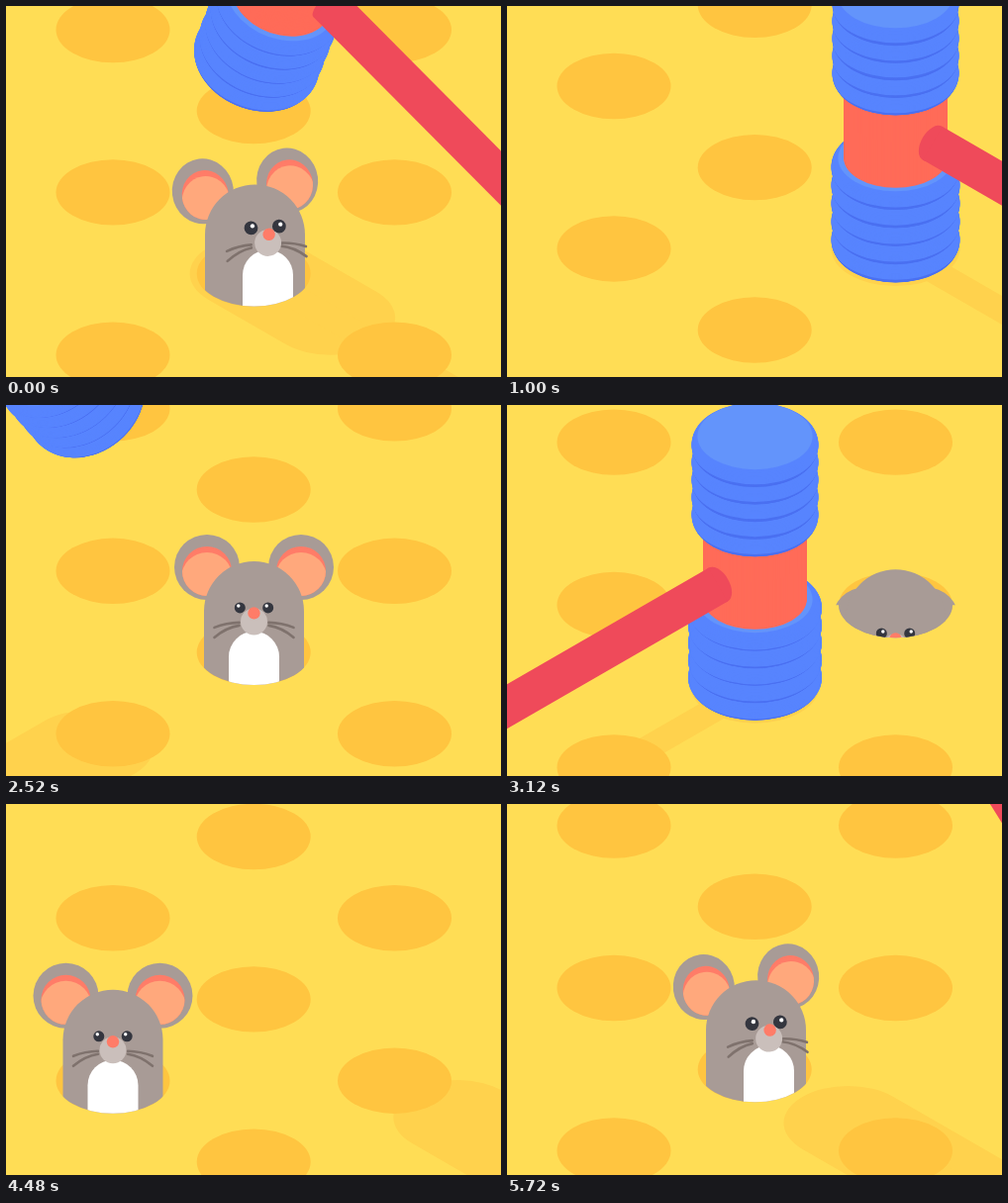
These frames come from a looping animation (500x375 px, 5.76 s). An HTML page with a canvas:

```html
<!DOCTYPE html>
<html>
<head>
<meta charset="utf-8">
<style>
html, body { margin: 0; width: 100%; height: 100%; overflow: hidden; background: #ffdd55; }
canvas { display: block; }
</style>
</head>
<body>
<canvas id="stage" width="500" height="375"></canvas>
<script>
const ctx = document.getElementById('stage').getContext('2d');
const LOOP = 5760, BEAT = 960, GAP = 164.4, SPEED = GAP / 2880;
const BLUE = '#5784fe', DARK = '#4a70f1', LIGHT = '#6394fb';
const FUR = '#a89b96', CORAL = '#ff7c68', SHADE = '#ffd24d';
const COS30 = Math.sqrt(3) / 2;
const RADIUS = 47.5, MID = 128.5, ARM = 580;

// Each hit: column x, hole y at impact, side the handle comes from
const hits = [
  [250.5, 270.4, 1], [392.5, 243.2, 1], [108, 298, -1],
  [250.5, 270.4, -1], [392.5, 243.2, 1], [108, 298, -1]
];

const clamp = v => Math.min(1, Math.max(0, v));
const smooth = v => (v = clamp(v), v * v * (3 - 2 * v));
const back = (v, c) => (v = clamp(v) - 1, 1 + (c + 1) * v ** 3 + c * v * v);
// Isometric view of the vertical plane that holds the handle
const project = (s, z) => [COS30 * s, s / 2 - z];
const ACROSS = [COS30, -0.5];

function circle(x, y, r, fill) {
  ctx.beginPath();
  ctx.arc(x, y, r, 0, 2 * Math.PI);
  ctx.fillStyle = fill;
  ctx.fill();
}

function disc([x, y], r, [ax, ay], [bx, by], fill) {
  ctx.save();
  ctx.transform(ax, ay, bx, by, x, y);
  circle(0, 0, r, fill);
  ctx.restore();
}

function line(from, to, width, color, cap = 'butt') {
  ctx.beginPath();
  ctx.moveTo(...from);
  ctx.lineTo(...to);
  ctx.lineWidth = width;
  ctx.lineCap = cap;
  ctx.strokeStyle = color;
  ctx.stroke();
}

function at(x, y, side, draw) {
  ctx.save();
  ctx.translate(x, y);
  ctx.scale(side, 1);
  draw();
  ctx.restore();
}

// Tilt of the mallet and the place of its middle, a ms after impact
function swing(a) {
  const u = Math.max(0, (30 - a) / 30);
  const deg = u > 0 ? Math.min(90, 21 * u ** 0.82) : 90 * clamp((a - 260) / 520) ** 2.3;
  const th = deg * Math.PI / 180, sin = Math.sin(th), cos = Math.cos(th);
  return { sin, cos, s: ARM * (1 - cos) + 9 * u * u, z: MID + ARM * sin };
}

function shadow(a) {
  const { sin, s } = swing(a), half = MID * sin;
  ctx.transform(COS30, 0.5, ...ACROSS, 0, 0);
  line([s - half, 0], [s + half + 0.01, 0], 106, SHADE, 'round');
  line([s, 0], [s + ARM + 200, 0], 29, SHADE);
}

function mallet(a) {
  const { sin, cos, s, z } = swing(a);
  const squash = 10 * Math.sin(Math.PI * clamp((a - 40) / 235));
  const point = (h, w) => project(
    s + (h - MID) * sin + w * cos,
    z + (h - MID) * cos - w * sin);
  const along = project(cos, -sin), up = project(sin, cos);
  const slice = (h, r, fill) => disc(point(h, 0), r, along, ACROSS, fill);

  function bellows(from, to, peak) {
    const ring = (to - from) / 5;
    for (let h = from; h < to; h++) {
      const phase = (h - from) / ring % 1;
      slice(h, RADIUS + (peak - RADIUS) * Math.sin(Math.PI * phase) ** 0.6,
        phase < 0.28 ? DARK : BLUE);
    }
    slice(to, RADIUS, LIGHT);
  }

  bellows(0, 92 - squash, 53 + squash / 2);
  for (let h = 92; h < 170; h++) slice(h - squash, 42.7, '#ff6b58');
  bellows(169 - squash, 257 - squash, 52.3);
  const grip = point(MID - squash, 43);
  disc(grip, 16, up, ACROSS, '#ef4a5a');
  line(grip, point(MID - squash, ARM + 250), 39, '#ef4a5a');
}

function ear(x, y, size, turn) {
  ctx.save();
  ctx.translate(x, y);
  ctx.scale(1 - 0.06 * turn, 1);
  circle(0, 0, 33, FUR);
  circle(2 * turn, 4, 25 * size, CORAL);
  ctx.clip();
  circle(2 * turn, 11, 26 * size, '#ffa87c');
  ctx.restore();
}

function dome(r, top, fill) {
  ctx.beginPath();
  ctx.arc(0, top + r, r, Math.PI, 0);
  ctx.lineTo(r, 200);
  ctx.lineTo(-r, 200);
  ctx.fillStyle = fill;
  ctx.fill();
}

function face(turn) {
  ctx.lineCap = 'round';
  ctx.lineWidth = 2.6;
  ctx.strokeStyle = '#7f726d';
  for (const s of [-1, 1]) {
    for (const [y, drop] of [[-30, 5], [-27, 12]]) {
      ctx.beginPath();
      ctx.moveTo(s * 15, y);
      ctx.quadraticCurveTo(s * 28, y - 1 + drop / 4, s * 40, y + drop);
      ctx.stroke();
    }
    const r = 5.5 + 1.4 * turn, y = -45 - 2 * turn;
    circle(s * 14.2, y, r, '#34363f');
    circle(s * 14.2 + 1.5, y - 2, r / 3.2, '#fff');
  }
  circle(2 * turn, -31, 13.5, '#cabfbb');
  circle(3.5 * turn, -39.5, 6.2, CORAL);
}

function mouse(a) {
  const rise = back((a + 755) / 250, 1.7), spread = back((a + 725) / 250, 3.5);
  const turn = smooth((a + 240) / 120);
  ctx.beginPath();
  ctx.rect(-200, -400, 400, 400);
  ctx.ellipse(0, 0, 57.5, 33, 0, 0, Math.PI);
  ctx.clip();
  ctx.translate(turn, 125 * (1 - rise) + 125 * clamp((a - 5) / 25));

  ctx.save();
  ctx.translate(-10 * turn, -86 - 2.5 * turn);
  ctx.rotate(-0.125 * turn);
  for (const s of [-1, 1])
    ear(s * (28 + 19.5 * spread - 4.5 * turn), 53 * (1 - spread), clamp(spread), turn);
  ctx.restore();

  dome(50.5, -92 + 2 * turn, FUR);
  ctx.translate(13 * turn, 21 * (1 - spread));
  dome(25.5, -21 - 3 * turn, '#fff');
  ctx.rotate(-0.06 * turn);
  face(turn);
}

function holes(t) {
  const shift = t * SPEED % GAP;
  for (const [x, y] of [[108, 23.9], [250.2, 106], [392.5, 23.9]])
    for (let i = -2; i < 3; i++) {
      ctx.beginPath();
      ctx.ellipse(x, y + shift + i * GAP, 57.5, 33.2, 0, 0, 2 * Math.PI);
      ctx.fillStyle = '#ffc540';
      ctx.fill();
    }
}

function frame(now) {
  const t = now % LOOP;
  ctx.fillStyle = '#ffdd55';
  ctx.fillRect(0, 0, 500, 375);
  const live = hits.map(([x, y, side], i) => {
    const a = (t - i * BEAT + LOOP * 1.5) % LOOP - LOOP / 2;
    return { x, y: y + a * SPEED, side, a };
  });
  const swings = live.filter(h => h.a > -140 && h.a < 780);
  for (const h of swings) at(h.x, h.y, h.side, () => shadow(h.a));
  holes(t);
  for (const h of live)
    if (h.a > -755 && h.a < 30) at(h.x, h.y, h.side, () => mouse(h.a));
  for (const h of swings) at(h.x, h.y, h.side, () => mallet(h.a));
}

const start = performance.now();
function tick() {
  frame(performance.now() - start);
  requestAnimationFrame(tick);
}
tick();
</script>
</body>
</html>
```
